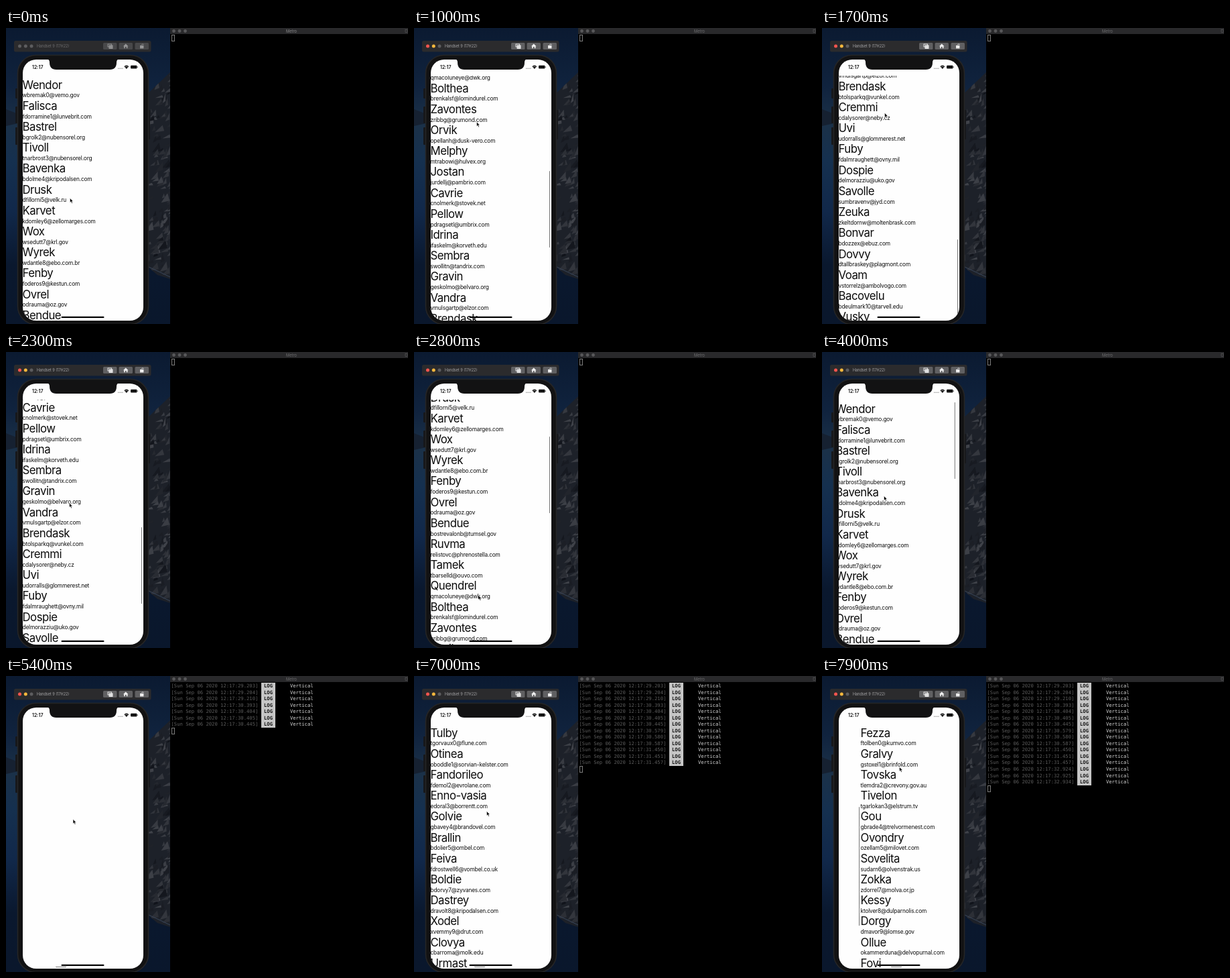
Write an HTML page that moves like this. It is 600 px wide and 441 px high and loops after 8 s.

```html
<!DOCTYPE html>
<html lang="en">
<head>
<meta charset="utf-8">
<title>Paged lists</title>
<style>
  html, body { margin: 0; width: 100%; height: 100%; overflow: hidden; background: #0b1c38; }
  #stage { position: relative; width: 600px; height: 441px; overflow: hidden; font-family: Inter, sans-serif; }
  #stage svg, #stage div { position: absolute; }
  .full { left: 0; top: 0; }
  #screen { left: 25px; top: 47px; width: 179.5px; height: 389px; border-radius: 20px; background: #fefefe; overflow: hidden; }
  #view { left: 0; top: 24px; width: 180px; height: 366px; overflow: hidden; }
  #strip, .page { top: 0; width: 180px; height: 366px; }
  .list { left: -.5px; top: 3.6px; color: #0c0c0c; white-space: nowrap; }
  #stage .list div { position: static; }
  .name { font-size: 16.8px; line-height: 20.8px; letter-spacing: -.03em; }
  .mail { font-size: 8.3px; line-height: 10.4px; letter-spacing: -.02em; }
  .thumb { background: #777; border-radius: 1px; }
  .page .thumb { left: 176.5px; width: 1.4px; }
  #hThumb { top: 385.6px; width: 16px; height: 1.3px; }
  #term { left: 245px; top: 0; width: 355px; height: 441px; background: #000; }
  #log { left: 1.5px; top: 10.3px; font: 7.2px/9.53px "DejaVu Sans Mono", monospace; white-space: pre; color: #5c5c5c; }
  #stage #log div { position: static; height: 9.53px; }
  #log b { display: inline-block; height: 9.6px; background: #c6c6c6; color: #111; }
  #log i { font-style: normal; color: #d4d4d4; }
  #caret { left: 1.5px; width: 3px; height: 8px; border: .8px solid #7c7c7c; }
</style>
</head>
<body>
<div id="stage">
  <svg class="full" width="600" height="441">
    <defs>
      <linearGradient id="sea" x2="0" y2="1">
        <stop stop-color="#0b1a31"/><stop offset=".2" stop-color="#10233e"/>
        <stop offset=".32" stop-color="#1b3148"/><stop offset=".45" stop-color="#15304f"/>
        <stop offset=".62" stop-color="#11284a"/><stop offset=".8" stop-color="#0a182e"/><stop offset="1" stop-color="#0a172c"/>
      </linearGradient>
      <clipPath id="cliff"><path d="M205 104L226 84L245 66V374L226 368L205 350Z"/></clipPath>
    </defs>
    <rect width="245" height="441" fill="url(#sea)"/>
    <path d="M0 121L18 128V142L0 146Z" fill="#162131"/>
    <g clip-path="url(#cliff)">
      <rect x="205" y="60" width="40" height="320" fill="#1d2129"/>
      <g id="rocks"></g>
    </g>
    <path d="M213 356L226 362L245 371" fill="none" stroke="#39465a"/>
    <g fill="#16171a">
      <rect x="14" y="90" width="4" height="15" rx="1"/><rect x="14" y="117" width="4" height="25" rx="1"/>
      <rect x="14" y="148" width="4" height="26" rx="1"/><rect x="211" y="122" width="4" height="44" rx="1"/>
    </g>
    <rect x="17.500" y="40.500" width="195" height="401" rx="27" fill="#121213" stroke="#252526" stroke-width="1.600"/>

    <g id="bar">
      <rect x="12" y="19" width="204.500" height="16.500" rx="2.500" fill="#2b2b2d"/>
      <circle id="red" cx="20.500" cy="27" r="2.500"/><circle id="yellow" cx="29.300" cy="27" r="2.500"/>
      <circle cx="38" cy="27" r="2.500" fill="#5d5d5f"/>
      <text id="device" x="46" y="29.200" font-size="5.500">Handset 9 (17H22)</text>
      <g id="tools">
        <g fill="#606062"><rect x="145" y="22" width="20.500" height="10" rx="1.500"/><rect x="168.500" y="22" width="20.500" height="10" rx="1.500"/><rect x="192.500" y="22" width="20.500" height="10" rx="1.500"/></g>
        <g fill="none" stroke="#eee" stroke-width=".9">
          <rect x="152" y="24" width="5.500" height="4"/><rect x="154" y="26" width="5" height="4.500" fill="#ddd"/>
          <rect x="200.500" y="26.500" width="4.500" height="3.500" fill="#eee"/><path d="M202 25.500Q203 23 205.500 24.500"/>
        </g>
        <path d="M175 27.300L178.700 23.500L182.500 27.300H181.500V30.300H179.700V28H177.700V30.300H176V27.300Z" fill="#eee"/>
      </g>
    </g>
  </svg>

  <div id="screen">
    <div id="view"><div id="strip"></div></div>
    <div id="hThumb" class="thumb"></div>
  </div>

  <svg class="full" width="245" height="441">
    <path d="M61 46Q65 47 65 51Q65 62 75 62H155Q165 62 165 51Q165 47 169 46Z" fill="#121213"/>
    <text x="39" y="60.800" font-size="7" font-weight="600" fill="#111">12:17</text>
    <path d="M167 60.200h7.500" stroke="#777" stroke-width="1.100" stroke-dasharray="1.200 .9"/>
    <path d="M176.300 57.200Q179.800 53.800 183.300 57.200L179.800 61Z" fill="#111"/>
    <path d="M177.300 58.200Q179.800 56.100 182.300 58.200" fill="none" stroke="#fff" stroke-width=".5"/>
    <rect x="186" y="55.800" width="9.500" height="4.800" rx="1.300" fill="#111"/>
    <rect x="196" y="57.300" width=".8" height="1.800" fill="#555"/>
    <rect x="82.500" y="429.800" width="64" height="2.200" rx="1.100" fill="#050505"/>
  </svg>

  <div id="term">
    <svg class="full" width="355" height="10">
      <rect width="355" height="9" fill="#29292b"/>
      <g fill="#58585a"><circle cx="5.500" cy="4.500" r="2.400"/><circle cx="14" cy="4.500" r="2.400"/><circle cx="22.500" cy="4.500" r="2.400"/></g>
      <text id="title" x="181" y="6.600" font-size="5.800" text-anchor="middle">Metro</text>
      <rect x="351" y="2.500" width="3" height="4" fill="none" stroke="#606060" stroke-width=".6"/>
    </svg>
    <div id="log"></div>
    <div id="caret"></div>
  </div>

  <svg id="mouse" class="full" width="8" height="10">
    <path d="M.5 .5V7L2 5.700L3.200 8.300L4.300 7.800L3.200 5.300H5.200Z" fill="#000" stroke="#fff" stroke-width=".5"/>
  </svg>
</div>

<script>
const $ = id => document.getElementById(id);

// Rough cliff: seeded slanted shards
let seed = 7;
const rand = n => (seed = seed * 16807 % 2147483647) / 2147483647 * n;
$('rocks').innerHTML = Array.from({ length: 130 }, () => {
  const x = 205 + rand(40), y = 64 + rand(310), w = 3 + rand(9), h = 4 + rand(12), l = 17 + rand(48);
  return `<path d="M${x} ${y}l${w} ${-h}l${rand(3)} ${h * .8}z" fill="rgb(${l},${l + 3},${l + 10})"/>`;
}).join('');

// Each entry: first name, surname, mail host
const people = `Wendor bremak vemo.gov,Falisca dorramine lunvebrit.com,Bastrel grolk nubensorel.org,
Tivoll narbrost nubensorel.org,Bavenka dolme kripodalsen.com,Drusk fillorni velk.ru,Karvet domley zellomarges.com,
Wox sedutt krl.gov,Wyrek dantle ebo.com.br,Fenby oderos kestun.com,Ovrel draum oz.gov,Bendue ostrevalon tumsel.gov,
Ruvma elistov phrenostella.com,Tamek barsell ouvo.com,Quendrel macoluney dwk.org,Bolthea renkals lomindurel.com,
Zavontes ribb grumond.com,Orvik pellan dusk-vero.com,Melphy trabow hulvex.org,Jostan urdell pambrio.com,
Cavrie nolmer stovek.net,Pellow dragset umbrix.com,Idrina faskel korveth.edu,Sembra wollit tandrix.com,
Gravin eskolm belvaro.org,Vandra mulsgart elzor.com,Brendask tolspark vunkel.com,Cremmi dalysore neby.cz,
Uvi dorrall glommerest.net,Fuby dalmraughet ovny.mil,Dospie elmorazzi uko.gov,Savolle umbraven jyd.com,
Zeuka keltdorn moltenbrask.com,Bonvar dozze ebuz.com,Dovvy tallbraske plagmont.com,Voam storrel ambolvogo.com,
Bacovelu deulmark tarvell.edu,Vusky gondel harvox.com`.split(/,\s*/);

const fourth = `Tulby gorvaux flune.com,Otinea boddle sorvian-kelster.com,Fandorileo demol evrolane.com,
Enno-vasia doral borrentt.com,Golvie bavey brandovel.com,Brallin dolier ombel.com,Feiva drostwell vombel.co.uk,
Boldie dorvy zyvanes.com,Dastrey ravolt kripodalsen.com,Xodel vemmy drut.com,Clovya barrom molk.edu,
Urmast pelkin dorvane.com`.split(/,\s*/);

const fifth = `Fezza tolben kumvo.com,Gralvy stoxel brinfold.com,Tovska lemdra crevony.gov.au,Tivelon garlokan elstrum.tv,
Gou brade trelvormenest.com,Ovondry zellam milovet.com,Sovelita udarn olvenstrak.us,Zokka dorrel molva.or.jp,
Kessy tolver dulparnolis.com,Dorgy mavor lomse.gov,Ollue kammerdun delvopurnal.com,Fovi restal humbro.com`.split(/,\s*/);

const pages = [people, people.slice(17, 31), people.slice(8, 22), people.slice(20, 34),
  [...fourth, ...people.slice(14, 30)], fifth];
const readyAt = [0, 4200, 5000, 5600, 5900, 7700];

const row = (entry, i) => {
  const [name, last, host] = entry.split(' ');
  return `<div class="name">${name}</div><div class="mail">${name[0].toLowerCase() + last + i.toString(36)}@${host}</div>`;
};
$('strip').innerHTML = pages.map((list, p) =>
  `<div class="page" style="left:${p * 180}px"><div class="list">${list.map(row).join('')}</div><div class="thumb"></div></div>`).join('');
const lists = document.querySelectorAll('.list');
const thumbs = document.querySelectorAll('.page .thumb');

// Seconds past 12:17; the clock reads 25.1 s when the loop starts
const stamps = [29.203, 29.204, 29.21, 30.393, 30.404, 30.405, 30.445, 30.579, 30.58, 30.587,
  31.45, 31.451, 31.457, 32.924, 32.925, 32.934];
$('log').innerHTML = stamps.map(s =>
  `<div>[Sun Sep 06 2020 12:17:${s.toFixed(3)}] <b> LOG </b>     <i>Vertical</i></div>`).join('');
const lines = [...$('log').children];

// Keys: time, then values
const scrollKeys = [[150, 0], [1700, 809], [1900, 815], [3180, 0]];
const scroll4Keys = [[7050, 0], [7550, 245]];
const pageKeys = [[3955, 0], [4450, 1], [4750, 1], [5080, 2], [5370, 3], [5850, 3], [6450, 4], [7600, 4], [8013, 5]];
const mouseKeys = [[200, 95, 253], [900, 93, 140], [1700, 93, 126], [1900, 93, 126], [2800, 95.500, 362], [3100, 96, 362],
  [3800, 96, 214], [3950, 96, 214], [4000, 92, 214], [4200, 50, 214], [4600, 100, 213], [4750, 100, 213], [4880, 55, 213],
  [5050, 100, 213], [5180, 55, 213], [5380, 99.500, 213], [5800, 108, 212], [6050, 55, 208], [6600, 108, 201],
  [7050, 108, 201], [7350, 112, 135], [7600, 116, 135], [7700, 70, 135], [7900, 115, 135]];

function at(keys, t) {
  const i = keys.findIndex(k => k[0] > t);
  if (i < 1) return keys.at(i).slice(1);
  const a = keys[i - 1], b = keys[i];
  const u = (t - a[0]) / (b[0] - a[0]), e = u * u * (3 - 2 * u);
  return a.slice(1).map((v, j) => v + (b[j + 1] - v) * e);
}

function scrollPage(p, y, thumbTop, height, shown) {
  lists[p].style.transform = `translateY(${-y}px)`;
  thumbs[p].style.cssText = `top:${thumbTop}px;height:${height}px;opacity:${shown ? 1 : 0}`;
}

function draw(t) {
  const [y0] = at(scrollKeys, t), [y4] = at(scroll4Keys, t), [pos] = at(pageKeys, t);
  scrollPage(0, y0, 4 + y0 * .297, 114, t > 150);
  scrollPage(4, y4, 4 + y4 * .49, 177, t > 7050);
  lists.forEach((list, p) => list.style.opacity = t < readyAt[p] ? 0 : 1);
  $('strip').style.transform = `translateX(${-pos * 180}px)`;
  $('hThumb').style.left = -.2 + 16.3 * pos + 'px';
  $('hThumb').style.opacity = t > 3955 ? 1 : 0;

  const count = stamps.filter(s => (s - 25.1) * 1000 <= t).length;
  lines.forEach((line, i) => line.style.visibility = i < count ? 'visible' : 'hidden');
  $('caret').style.top = 10.3 + 9.53 * count + 'px';

  const [x, y] = at(mouseKeys, t);
  $('mouse').style.transform = `translate(${x}px, ${y}px)`;

  const active = t >= 200;
  $('red').setAttribute('fill', active ? '#f9554f' : '#5d5d5f');
  $('yellow').setAttribute('fill', active ? '#f5b83d' : '#5d5d5f');
  $('device').setAttribute('fill', active ? '#a9a9ab' : '#707072');
  $('tools').setAttribute('opacity', active ? 1 : .55);
  $('title').setAttribute('fill', active ? '#6e6e70' : '#89898b');
}

function frame() {
  draw(Math.floor(performance.now() / 100) * 100 % 8000);
  requestAnimationFrame(frame);
}
frame();
</script>
</body>
</html>
```
